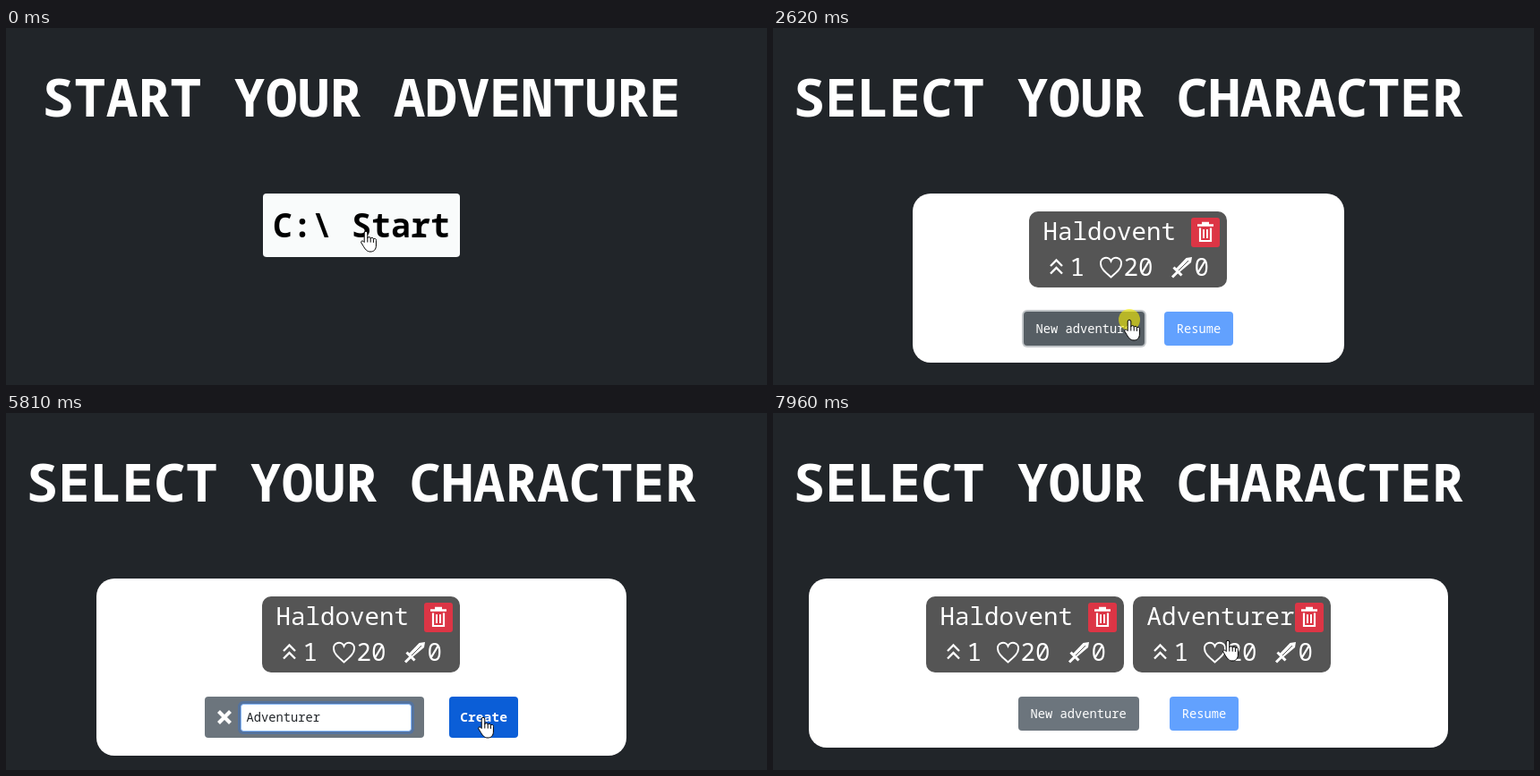
These frames come from a looping animation (850 px wide and 399 px high, 8000 ms). An HTML page:

```html
<!DOCTYPE html>
<html lang="en">
<head>
<meta charset="utf-8">
<title>Character select</title>
<style>
  html, body { margin: 0; width: 100%; height: 100%; overflow: hidden; background: #212529; }
  svg { display: block; width: 850px; height: 399px; font-family: "Noto Sans Mono", "DejaVu Sans Mono", monospace; }
  text { white-space: pre; }
</style>
</head>
<body>
<svg id="stage" viewBox="0 0 850 399"></svg>
<script>
const LOOP = 8000;
const SELECT = 340, FORM = 2720, FOCUS = 3690, TYPE = 4090, TYPED = 4860, BLUR = 6080, LOAD = 6280, DONE = 6580;
const HERO = 'Haldovent', NEWCOMER = 'Adventurer';
const GRAY = '#6c757d', GRAY_HOVER = '#5c636a', GRAY_DOWN = '#565e64', PALE_BLUE = '#62a1fe';

// Pointer path: time, x, y
const path = [
  [0, 402, 227], [700, 402, 227], [1100, 401, 267], [2000, 399, 319], [2400, 398, 325.5],
  [3190, 398, 325.5], [3590, 391, 330], [3790, 391, 330], [3990, 394, 331],
  [5010, 394, 331], [5210, 410, 332], [5610, 520, 339], [5810, 533, 340],
  [6760, 533, 340], [7560, 515, 279], [7960, 508, 253.5], [8000, 508, 253.5]
];
const clicks = [[50, 120], [2520, 2720], [3590, 3790], [6080, 6280]];
const tickStarts = [0, 340, 700, 2120, 3190, 5010, 6080, 6760];

const clamp = v => Math.max(0, Math.min(1, v));

// The screen refreshes every 100 ms, counted from the latest start
function snap(t) {
  const s = tickStarts.filter(v => v <= t).pop();
  return s + Math.floor((t - s) / 100) * 100;
}

function pointerAt(t) {
  const i = Math.max(1, path.findIndex(p => p[0] > t));
  const [t0, x0, y0] = path[i - 1], [t1, x1, y1] = path[i];
  const k = (t - t0) / (t1 - t0);
  return [x0 + (x1 - x0) * k, y0 + (y1 - y0) * k];
}

const rect = (x, y, w, h, r, fill, more = '') =>
  `<rect x="${x}" y="${y}" width="${w}" height="${h}" rx="${r}" fill="${fill}" ${more}/>`;
const text = (x, y, size, str, fill = '#fff', more = '') =>
  `<text x="${x}" y="${y}" font-size="${size}" fill="${fill}" ${more}>${str}</text>`;
const line = (d, color, width, more = '') =>
  `<path d="${d}" fill="none" stroke="${color}" stroke-width="${width}" ${more}/>`;
const ring = (x, y, w, h, r, size, color) =>
  rect(x - size, y - size, w + 2 * size, h + 2 * size, r + size, color);
const BOLD = 'font-weight="700"', MEDIUM = 'font-weight="500"';
const title = str => text(397, 99, 59.45, str, '#fff', BOLD + ' text-anchor="middle"');
const panel = (x, w, h) => rect(x, 185, w, h, 20, '#fff');

const icons =
  line('M24 61l6.5-6.5L37 61M24 69.5l6.5-6.5 6.5 6.5', '#fff', 2.3) +
  line('M91.5 73.5C84 67 80 63.5 80 58.5A6 6 0 0 1 91.5 55.5A6 6 0 0 1 103 58.5C103 63.5 99 67 91.5 73.5Z', '#fff', 2) +
  '<path d="M182 51L175.500 52 164 64l4 4L181 57Z" fill="#fff"/>' +
  line('M178 55L166 67', '#555', 1) +
  line('M161.500 62.500L170.500 71.500M165.500 68L160 73.500', '#fff', 3) +
  rect(181, 7, 32, 33, 3, '#dc3545') +
  line('M188 15.500h18M193 13h8', '#fff', 2.4) +
  line('M191 18.500v14.500h12v-14.500', '#fff', 2.2) +
  line('M195 20v10M199 20v10', '#fff', 2);

const card = (x, name) => `<g transform="translate(${x} 205)">` +
  rect(0, 0, 221, 85, 10, '#555') + icons +
  text(15.5, 32, 27.5, name) + text(45.5, 72, 27.5, '1') +
  text(105.5, 72, 27.5, '20') + text(184.5, 72, 27.5, '0') + '</g>';

function startScreen() {
  return title('START YOUR ADVENTURE') + rect(287, 185, 220, 71, 4, '#f9fbfb') +
    text(298, 234, 36.67, 'C:\\ Start', '#000', BOLD);
}

function menu(x, resumeX, fill, glow = 0) {
  return (glow ? ring(x, 317, 135, 38, 4, glow, '#c1c5c8') : '') +
    rect(x, 317, 135, 38, 4, fill) + text(x + 13.5, 341, 13.75, 'New adventure', '#fff', MEDIUM) +
    rect(resumeX, 317, 77, 38, 4, PALE_BLUE) + text(resumeX + 13.7, 341, 13.75, 'Resume', '#fff', MEDIUM);
}

function nameField(x, t, fill) {
  const glow = 3 * (1 - clamp((t - FOCUS) / 150));
  const focused = t >= FOCUS && t < BLUR;
  const count = t < TYPE ? 0 : Math.min(10, 1 + Math.floor((t - TYPE) / ((TYPED - TYPE) / 9)));
  const caretOn = focused && (t < TYPED || (t - TYPED) % 1060 < 530);
  const caretX = x + 47.5 + count * 8.25;
  const focusGlow = focused ? 3 * clamp((t - FOCUS) / 150) : 0;
  return (glow ? ring(x, 317, 245, 46, 4, glow, '#c1c5c8') : '') +
    rect(x, 317, 245, 46, 4, fill) +
    line(`M${x + 15.5} 333.500l13 13m0-13l-13 13`, '#fff', 4.2) +
    (focusGlow ? ring(x + 40, 325, 191, 31, 3, focusGlow, 'rgba(13,110,253,.25)') : '') +
    rect(x + 40.5, 325.5, 190, 30, 3, '#fff', `stroke="${focusGlow ? '#86b7fe' : '#ced4da'}"`) +
    (count ? text(x + 46.5, 345, 13.75, NEWCOMER.slice(0, count), '#212529')
           : text(x + 46.5, 345, 14.67, NEWCOMER, GRAY)) +
    (caretOn ? line(`M${Math.floor(caretX) + .5} 331v18`, '#000', 1) : '');
}

function loadingButton(t) {
  const turn = (Math.min(t, 6380) - LOAD) / 750 * 360;
  return ring(469, 317, 131, 46, 4, 1.5, '#cfe0fb') + rect(469, 317, 131, 46, 4, '#6195e1') +
    line('M3.300 -3.300A4.700 4.700 0 1 0 3.300 3.300', '#eef4fd', 2.6,
      `transform="translate(488.500 340.500) rotate(${turn})"`) +
    text(496.5, 345, 14.67, 'Loading...', '#eef4fd', BOLD);
}

function selectScreen(t, tick, [x, y]) {
  const head = title('SELECT YOUR CHARACTER');
  if (t < FORM) {
    const fill = tick >= 2520 ? GRAY_DOWN : y >= 317 ? GRAY_HOVER : GRAY;
    return head + panel(156, 482, 189) + card(286, HERO) +
      menu(280, 437, fill, 3 * clamp((tick - 2520) / 150));
  }
  if (t < LOAD) {
    const fill = tick < 2920 ? GRAY_DOWN : x < 467 ? GRAY_HOVER : GRAY;
    const blue = x < 495 ? '#0d6efd' : t < BLUR ? '#0b5ed7' : '#0a58ca';
    return head + panel(101, 592, 198) + card(286, HERO) + nameField(222, t, fill) +
      (t >= BLUR ? ring(495, 317, 77, 46, 4, 3 * clamp((tick - BLUR) / 150), '#98c1fe') : '') +
      rect(495, 317, 77, 46, 4, blue) + text(507.2, 345, 14.67, 'Create', '#fff', BOLD);
  }
  if (t < DONE) {
    return head + panel(74, 646, 198) + card(287, HERO) + nameField(194, t, GRAY) + loadingButton(tick);
  }
  return head + panel(40, 714, 189) + card(171, HERO) + card(402, NEWCOMER) + menu(274, 443, GRAY);
}

const cursors = {
  hand: '<path d="M-1.800 12.500V2A1.800 1.800 0 0 1 1.800 2V8A1.700 1.700 0 0 1 5.200 8.600A1.600 1.600 0 0 1 8.400 9.400' +
    'A1.600 1.600 0 0 1 11.400 10.500V16C11.400 20.500 9 23 5 23S-1 20 -3 16.500L-5.200 13C-6 11 -3.500 10 -1.800 12.500Z' +
    'M1.800 8v4.500M5.200 8.600v4M8.400 9.400v3.500" fill="#fff" stroke="#000"/>',
  arrow: '<path d="M0 0V15.500L3.600 12.200 6.200 18 8.600 17 6.100 11.300H11Z" fill="#fff" stroke="#000"/>',
  beam: line('M-1.500 -5.500h6M1.500 -5.500v13M-1.500 7.500h6', '#000', 1)
};

function cursorKind(t, [x, y]) {
  if (t < SELECT) return 'hand';
  if (t < FORM || t >= DONE) return y < 290 || (t < FORM && y >= 317) ? 'hand' : 'arrow';
  if (t >= LOAD) return 'arrow';
  if (t < 3190) return 'hand';
  if (x < 453) return 'beam';
  return x < 467 || x >= 495 ? 'hand' : 'arrow';
}

function scene(t) {
  const tick = snap(t), pos = pointerAt(tick);
  const pressed = clicks.some(([a, b]) => t >= a && t < b);
  return (t < SELECT ? startScreen() : selectScreen(t, tick, pos)) +
    `<g transform="translate(${Math.round(pos[0])} ${Math.round(pos[1])})">` +
    (pressed ? '<circle r="12" fill="#faf200" fill-opacity=".6"/>' : '') +
    cursors[cursorKind(t, pos)] + '</g>';
}

const stage = document.getElementById('stage');
const begin = performance.now();
function frame() {
  stage.innerHTML = scene((performance.now() - begin) % LOOP);
  requestAnimationFrame(frame);
}
frame();
</script>
</body>
</html>
```
